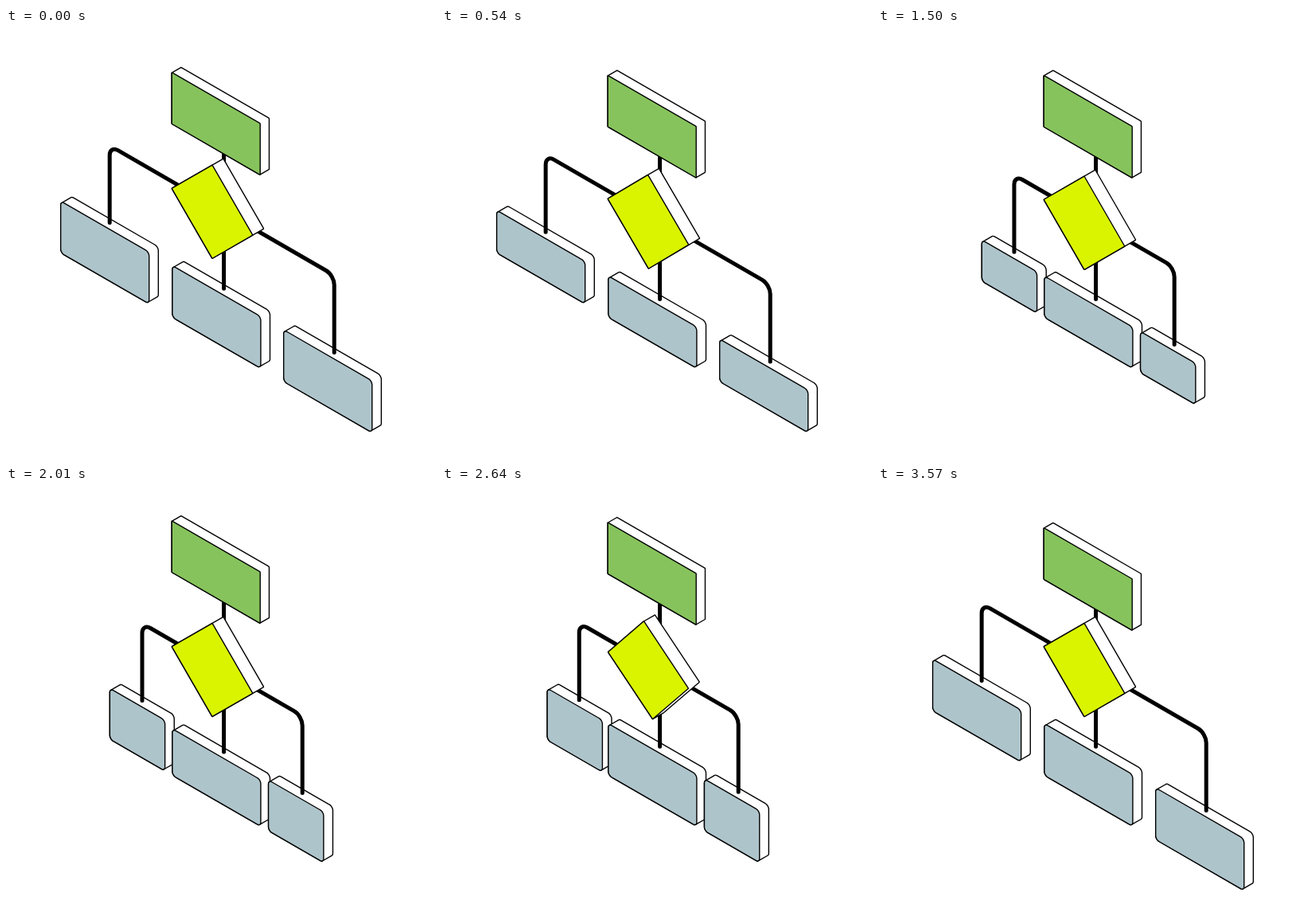
Recreate the animation shown at these times as an HTML page with a canvas. Size 540 px wide and 540 px high, loop 3600 ms.

```html
<!DOCTYPE html>
<html lang="en">
<head>
<meta charset="utf-8">
<title>Isometric flow chart</title>
<style>
html, body { margin: 0; width: 100%; height: 100%; overflow: hidden; background: #fff; }
canvas { display: block; width: 540px; height: 540px; }
</style>
</head>
<body>
<canvas id="stage" width="540" height="540"></canvas>
<script>
const ctx = document.getElementById('stage').getContext('2d');
const LOOP = 3600, STEP = 30;
const COS = Math.cos(Math.PI / 6), SLOPE = Math.tan(Math.PI / 6);
const STRONG = 3.2, SOFT = 2.2, NONE = 0;

// Cubic ease in and out; pull sets the anticipation and the overshoot.
function ease(x, pull) {
  if (x <= 0) return 0;
  if (x >= 1) return 1;
  if (x > .5) return 1 - ease(1 - x, pull);
  const u = 2 * x;
  return u * u * ((pull + 1) * u - pull) / 2;
}

// Goes from 0 to 1 at one time in the loop and returns to 0 at another.
function swing(t, out, back, pull, outTime = 700, backTime = outTime) {
  const wrap = ms => (ms + LOOP) % LOOP;
  const now = wrap(t - out), gap = wrap(back - out);
  return ease(now / outTime, pull) - ease((now - gap) / backTime, pull);
}

// Rounded rectangle centred on (x, y), turned within the isometric plane.
function facePoints(x, y, w, h, r, angle) {
  const points = [], c = Math.cos(angle), s = Math.sin(angle);
  [[1, 1], [-1, 1], [-1, -1], [1, -1]].forEach(([sx, sy], corner) => {
    for (let i = 0; i <= 8; i++) {
      const q = (corner + i / 8) * Math.PI / 2;
      const u = sx * (w / 2 - r) + r * Math.cos(q);
      const v = sy * (h / 2 - r) + r * Math.sin(q);
      const a = u * c - v * s, b = u * s + v * c;
      points.push([x + a * COS, y + a / 2 + b]);
    }
  });
  return points;
}

function hull(points) {
  const sorted = points.slice().sort((p, q) => p[0] - q[0] || p[1] - q[1]);
  const half = list => {
    const out = [];
    for (const p of list) {
      while (out.length > 1) {
        const [m, n] = out.slice(-2);
        if ((n[0] - m[0]) * (p[1] - m[1]) - (n[1] - m[1]) * (p[0] - m[0]) > 0) break;
        out.pop();
      }
      out.push(p);
    }
    return out.slice(0, -1);
  };
  return half(sorted).concat(half(sorted.reverse()));
}

function paint(points, fill) {
  ctx.beginPath();
  points.forEach(p => ctx.lineTo(p[0], p[1]));
  ctx.closePath();
  ctx.fillStyle = fill;
  ctx.fill();
  ctx.lineWidth = 1.4;
  ctx.stroke();
}

function slab(x, y, w, h, r, depth, fill, angle = 0) {
  const front = facePoints(x, y, w, h, r, angle);
  const back = front.map(p => [p[0] + depth * COS, p[1] - depth / 2]);
  paint(hull(front.concat(back)), '#fff');
  paint(front, fill);
}

// Draws a child box and returns the point where its connector ends.
function child(x, narrow, drop, lineX) {
  const h = 65 - 13.2 * drop;
  const bottom = 314.4 + (x - 124.2) * SLOPE;
  slab(x, bottom - h / 2, 128.2 - 48.2 * narrow, h, 5, 13.4, '#aec4cb');
  return [lineX, bottom - h + (lineX - x) * SLOPE - 8.3];
}

function connectors(left, mid, right, barY, topY) {
  const x0 = mid[0];
  const local = ([x, y]) => [(x - x0) / COS, y - barY - (x - x0) * SLOPE];
  const [la, lb] = local(left), [ra, rb] = local(right);
  ctx.beginPath();
  ctx.moveTo(x0, topY);
  ctx.lineTo(mid[0], mid[1]);
  ctx.save();
  ctx.transform(COS, .5, 0, 1, x0, barY);
  ctx.moveTo(la, lb);
  ctx.arcTo(la, 0, 0, 0, 12);
  ctx.arcTo(ra, 0, ra, rb, 12);
  ctx.lineTo(ra, rb);
  ctx.restore();
  ctx.lineWidth = 5;
  ctx.stroke();
}

function draw(t) {
  const greenY = 45.7 + 13.8 * swing(t, 3220, 1480, STRONG);
  const yellowY = 231.3 + 13.5 * swing(t, 3500, 1570, STRONG, 1100, 700);
  const sideDrop = swing(t, 60, 1600, STRONG, 830, 700);
  const midDrop = swing(t, 30, 1660, STRONG, 830, 700);
  const spin = 90 * (ease((t - 520) / 700, STRONG) + ease((t - 2551) / 700, STRONG));

  const leftShift = ms => 40.8 * swing(ms, 590, 2540, SOFT, 800);
  const rightShift = ms => -40 * swing(ms, 690, 2620, SOFT, 800);
  const leftNarrow = swing(t, 740, 2690, NONE, 500);
  const rightNarrow = swing(t, 840, 2770, NONE, 500);
  const lag = t - 20;

  ctx.fillStyle = '#fff';
  ctx.fillRect(0, 0, 540, 540);
  ctx.strokeStyle = '#000';
  ctx.lineCap = ctx.lineJoin = 'round';

  const left = child(124.2 + leftShift(t), leftNarrow, sideDrop, 130.2 + leftShift(lag));
  const mid = child(264.4, 0, midDrop, 273.6);
  const right = child(404.2 + rightShift(t), rightNarrow, sideDrop, 412.2 + rightShift(lag));
  connectors(left, mid, right, 230.5 + 13.2 * sideDrop, greenY + 60);
  slab(259, yellowY, 83, 83, .6, 16, '#daf400', (spin - 45) * Math.PI / 180);
  slab(263.7, greenY + 64.3, 128.2, 64.6, .8, 13, '#87c35c');
}

const start = performance.now();
function tick() {
  const t = (performance.now() - start) % LOOP;
  draw(Math.floor(t / STEP) * STEP);
  requestAnimationFrame(tick);
}
tick();
</script>
</body>
</html>
```
